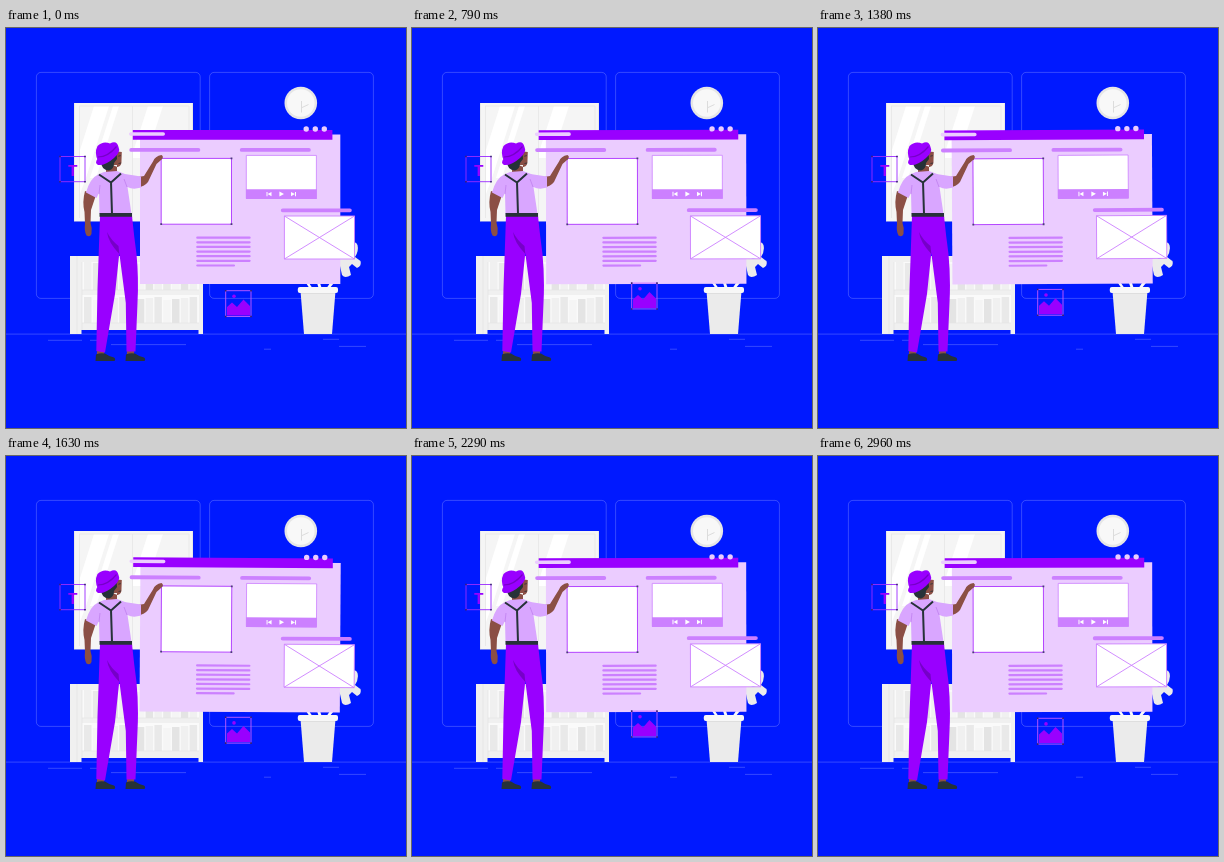
These frames come from a looping animation (400 px wide and 400 px high, 3000 ms). An HTML page:

```html
<!DOCTYPE html>
<html lang="en">
<head>
<meta charset="utf-8">
<title>Wireframe board</title>
<style>
  html, body { margin: 0; width: 100%; height: 100%; overflow: hidden; background: #0019ff; }
  svg { display: block; width: 100vw; height: 100vh; }
</style>
</head>
<body>
<svg viewBox="0 0 400 400" fill="none">
  <g stroke="#fff" stroke-opacity=".3" stroke-width=".7">
    <rect x="30.4" y="44.4" width="163.8" height="226" rx="4.5"/>
    <rect x="203.6" y="44.4" width="163.8" height="226" rx="4.5"/>
    <path d="M0 306.1H400M42 312.3H76M84 312.3H91M105 316.6H180M258 321.2H265M317 311.3H333M333 318.4H360"/>
  </g>

  <!-- window -->
  <path fill="#e8e8e8" d="M68 75H187V193.500H68Z"/>
  <path fill="#f5f5f5" d="M69 75H186V193H69Z"/>
  <path fill="#fff" d="M88 78H103L80 150 74 166V122ZM107 78H113L90 150H84ZM142 78H157L140 130H127V124Z"/>
  <path stroke="#e6e6e6" stroke-width=".8" d="M73.500 78V190M126.500 78V190M183 78V190M73 78H183"/>

  <!-- shelf -->
  <path fill="#f0f0f0" d="M64 228H197V306H192.500V302H75.500V306H64Z"/>
  <path fill="#fafafa" d="M76 234H193V262H76ZM76 267H193V295H76Z"/>
  <g id="books"></g>
  <path stroke="#e3e3e3" stroke-width=".7" d="M71 228V306M76 234V302M76 262H193M76 295H193"/>

  <!-- clock -->
  <circle cx="294.800" cy="75" r="16.300" fill="#e6e6e6"/>
  <circle cx="294.800" cy="75" r="13.800" fill="#f8f8f8"/>
  <path stroke="#dcdcdc" stroke-width="1" d="M295.500 73V84.500M295 80L302.500 76.500"/>

  <!-- plant -->
  <g fill="#ebebeb">
    <path d="M331 231Q335 227 341 231L347 229 346 215Q350 213 351.500 217 353 223 349 229L354.500 233Q356 238 351 240L346 236 343 239 345 247Q339 251 336 247L334 238Z"/>
    <path fill="#fafafa" d="M300 255L304 261H307L303 255ZM311 255L313 261H316L314 255ZM324 255L320 261H323L328 255Z"/>
    <path d="M294.500 263H329.500L326 306H298Z"/>
    <rect x="291.800" y="259" width="40.200" height="6" rx="2" fill="#f7f7f7"/>
    <path fill="#dedede" d="M295 265H329V266H295Z"/>
  </g>

  <!-- board -->
  <g id="board">
    <path fill="#ebccff" d="M134 106.500H334.300V256H134Z"/>
    <path fill="#9900ff" d="M126.800 102H326.400V111.700H126.800Z"/>
    <g fill="#ebccff">
      <rect x="123" y="104.200" width="36" height="3.600" rx="1.800"/>
      <circle cx="300.200" cy="101" r="2.700"/>
      <circle cx="309.300" cy="101" r="2.700"/>
      <circle cx="318.300" cy="101" r="2.700"/>
    </g>
    <g fill="#cc80ff">
      <rect x="123.300" y="120" width="71" height="3.800" rx="1.900"/>
      <rect x="233.800" y="120" width="71" height="3.800" rx="1.900"/>
    </g>
    <path fill="#fff" stroke="#9900ff" stroke-width=".7" d="M155.200 130.400H225.500V196.200H155.200Z"/>
    <path fill="#4b3f78" d="M154.300 129.500h1.800v1.800h-1.800zM224.600 129.500h1.800v1.800h-1.800zM154.300 195.300h1.800v1.800h-1.800zM224.600 195.300h1.800v1.800h-1.800z"/>
    <path fill="#fff" stroke="#cc80ff" stroke-width=".8" d="M240.300 127.400H310.400V170.500H240.300Z"/>
    <path fill="#cc80ff" d="M240 161.300H310.800V171H240Z"/>
    <path fill="#fff" d="M265.500 163.900V168.300L261.600 166.100ZM260.500 163.900h1v4.400h-1zM273.400 163.600V168.600L278 166.100ZM285 163.900V168.300L288.900 166.100ZM289 163.900h1v4.400h-1z"/>
    <g id="lines" stroke="#cc80ff" stroke-width="2.200" stroke-linecap="round"></g>
    <path fill="#fff" stroke="#cc80ff" stroke-width=".9" d="M278.400 188H348.500V231H278.400ZL348.500 231M348.500 188L278.400 231"/>
    <rect x="274.800" y="180.400" width="71" height="3.800" rx="1.900" fill="#cc80ff"/>
  </g>

  <!-- text tile -->
  <path stroke="#9a2cff" stroke-width=".9" d="M54 128.500H79V153.700H54Z"/>
  <path fill="#35206e" d="M53.200 127.700h1.600v1.600h-1.600zM78.200 127.700h1.600v1.600h-1.600zM53.200 152.900h1.600v1.600h-1.600zM78.200 152.900h1.600v1.600h-1.600z"/>
  <text x="66.800" y="147.700" fill="#9900ff" font-family="Roboto, sans-serif" font-size="15.500" font-weight="700" text-anchor="middle">T</text>

  <!-- picture tile -->
  <g id="tile">
    <path stroke="#c45cff" stroke-width=".9" d="M219.700 262.700H245V288.500H219.700Z"/>
    <path fill="#9900ff" d="M221 287.500V279L226 274.500 231 279 237.500 271.500 244 278V287.500Z"/>
    <circle cx="228" cy="268.300" r="1.800" fill="#9900ff"/>
    <path fill="#35206e" d="M218.900 261.900h1.600v1.600h-1.600zM244.200 261.900h1.600v1.600h-1.600zM218.900 287.700h1.600v1.600h-1.600zM244.200 287.700h1.600v1.600h-1.600z"/>
  </g>

  <!-- man -->
  <path fill="#8b4f45" d="M79 163Q76 174 78.500 184L79 196Q78 203 80.500 207.500 84 209.500 85.500 206 86.500 200 84.500 195L85 182 90 167ZM132 149L138 148 147 133.500Q149 128 155.500 127 158.500 129 155 132L150.500 136 142 154Q138 159 132 159Z"/>
  <path fill="#8b4f45" d="M104 136L111.500 139Q116 138 115.500 132L115.800 124 107 123 101 130ZM100 137H111V149H100Z"/>
  <path fill="#263238" d="M95 133Q95 142 103 142.500 108 141 108 135L111 131 110.500 123 99 127Z"/>
  <path stroke="#263238" stroke-width=".8" d="M112.300 128.200L114.800 127.600M112.500 135.500L115 135"/>
  <path fill="#9900ff" d="M92 133Q88 125 91.500 118 97 112.500 104 115.500 111 112 112.500 119 115 124 108 130 99 138 92 137 88 135 92 130Z"/>
  <path stroke="#7600c8" stroke-width="1.200" d="M92 129Q102 129 110.500 118.500"/>
  <path fill="#d9a6ff" d="M98 144L111 143 119 146 135 148.500V159.500Q127 162 121.500 159L125.500 186H93.500L93 165 90.500 170 80 164.500Q84 150 93 146Z"/>
  <path stroke="#b875ea" stroke-width=".6" d="M93 166L94 157M121 159L118 151"/>
  <path stroke="#263238" stroke-width="2" d="M93 146.500L105 154.500 115 145.500M105 154L106 186"/>
  <path fill="#8b4f45" d="M91 321H98V328H91ZM121 321H128V328H121Z"/>
  <path fill="#9900ff" d="M94 188H126Q128 208 130.500 226 132.800 250 131.500 275L129.500 323.500H120.500L119.800 275 113.300 225 109 266 99 324.500 90.300 323 91.500 260Z"/>
  <path fill="#7600c8" d="M101 204Q102 214 113.300 226L112.500 218Q105 212 101 204Z"/>
  <path fill="#263238" d="M93.500 185H126V188.700H93.500ZM90 326.500Q94 324.500 99 325.500 103 328.500 108 329.500 110 331 108.500 333H89.500ZM120 326.500Q124 324.500 129 325.500 133 328.500 138 329.500 140 331 138.500 333H119.500Z"/>
</svg>
<script>
  const $ = id => document.getElementById(id);
  const shades = ['#f0f0f0', '#e9e9e9', '#f5f5f5', '#e4e4e4'];
  const book = (x, y, i) =>
    `<path fill="${shades[i % 4]}" d="M${x} ${y}h7.500V${y < 250 ? 262 : 295}h-7.500z"/>`;

  let books = '';
  for (let i = 0; i < 13; i++) {
    const x = 78 + i * 8.8;
    books += book(x, 234 + i * 5 % 4, i) + book(x, 269 + i * 3 % 4, i + 1);
  }
  $('books').innerHTML = books;

  let lines = '';
  for (let i = 0; i < 7; i++)
    lines += `<path d="M191.300 ${209.7 + i * 4.63}H${i < 6 ? 243.600 : 228}"/>`;
  $('lines').innerHTML = lines;

  const PERIOD = 1500;
  // Triangle wave from -1 to 1, rising through zero at p = 0
  const wave = p => 1 - 4 * Math.abs((p + 0.25) % 1 - 0.5);

  function draw() {
    const p = performance.now() % PERIOD / PERIOD;
    $('board').setAttribute('transform', `rotate(${wave(p)} 236 177)`);
    $('tile').setAttribute('transform', `translate(0 ${-4 - 4 * wave((p + 0.75) % 1)})`);
    requestAnimationFrame(draw);
  }
  draw();
</script>
</body>
</html>
```
